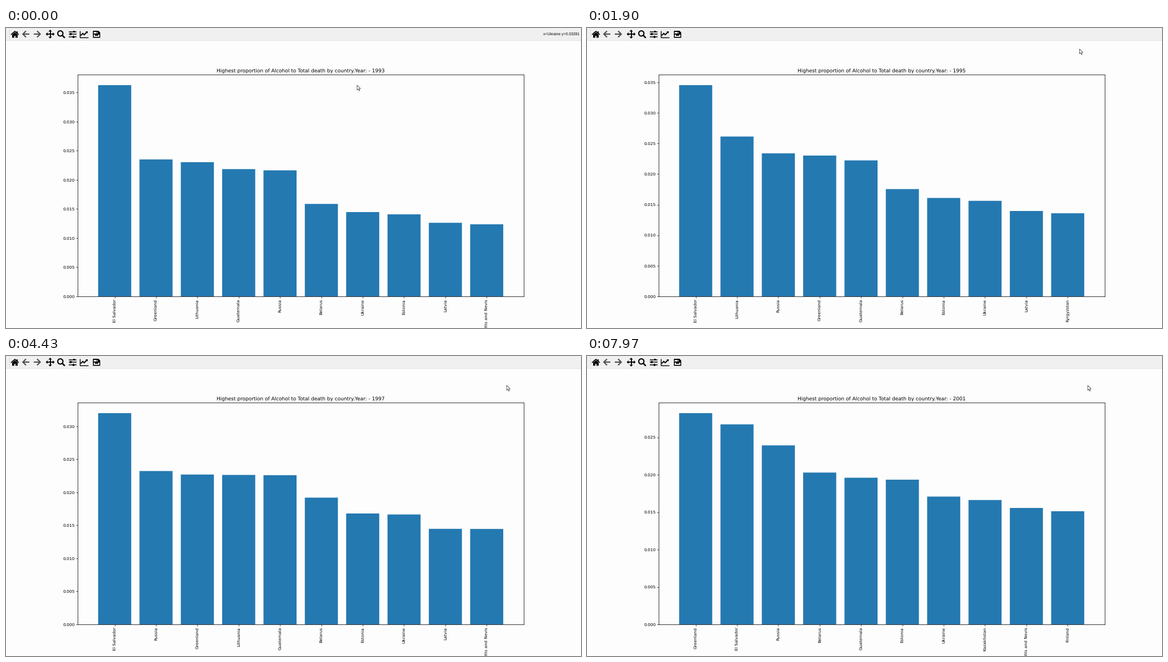
Write a matplotlib script that moves like this. It is 1035x541 px and loops after 8 s.

```python
import matplotlib.pyplot as plt
import numpy as np
from matplotlib.animation import FuncAnimation
from matplotlib.patches import Circle, Polygon, Rectangle
from matplotlib.ticker import FormatStrFormatter, MultipleLocator

W, H, DPI = 1035, 541, 72          # at 72 dpi one point is one pixel
FRAMES, STEP = 200, 40
FIRST_YEAR, LAST_YEAR = 1993, 2001
FIRST_CHANGE, YEAR_MS = 820, 1013
PAPER, BAR, INK, GREY, PANEL = "#fdfdfd", "#2479b1", "#000000", "#4f4f4f", "#f0f0f0"

plt.rcParams["font.family"] = "DejaVu Sans"
plt.rcParams["text.hinting"] = "no_hinting"
plt.rcParams["toolbar"] = "None"

# key shares (1e-5), spread evenly from the first to the last year
TRENDS = {
    "El Salvador": (3628, 3453, 3200, 2974, 2673),
    "Greenland": (2352, 2302, 2270, 2568, 2823),
    "Lithuania": (2305, 2613, 2264, 1621, 1300),
    "Guatemala": (2186, 2260, 1960),
    "Russia": (2165, 2338, 2323, 2246, 2392),
    "Belarus": (1588, 1920, 2029),
    "Ukraine": (1448, 1600, 1730, 1708),
    "Estonia": (1409, 1609, 1680, 1745, 1934),
    "Latvia": (1264, 1440, 1455, 1440),
    "Saint Kitts and Nevis": (1238, 1446, 1556),
    "Kyrgyzstan": (1235, 1400, 1200, 1200),
    "Kazakhstan": (1000, 1270, 1662),
    "Finland": (1200, 1512),
}


def share(name, year):
    keys = TRENDS[name]
    return 1e-5 * np.interp(year, np.linspace(FIRST_YEAR, LAST_YEAR, len(keys)), keys)


def ranking(year):
    pairs = [(share(name, year), name) for name in TRENDS]
    return sorted(pairs, reverse=True)[:10]


fig = plt.figure(figsize=(W / DPI, H / DPI), dpi=DPI, facecolor=PAPER)

# chart
LEFT, RIGHT, TOP, BOTTOM = 129.4, 931.5, 84, 484
ax = fig.add_axes([LEFT / W, 1 - BOTTOM / H, (RIGHT - LEFT) / W, (BOTTOM - TOP) / H],
                  facecolor=PAPER)
bars = ax.bar(range(10), np.ones(10), 0.8, color=BAR, snap=False)
ax.set_xlim(-0.89, 9.89)
ax.set_xticks(range(10))
ax.yaxis.set_major_locator(MultipleLocator(0.005))
ax.yaxis.set_major_formatter(FormatStrFormatter("%.3f"))
ax.tick_params(length=2.6, width=0.7, pad=2.6, labelsize=7.49)
ax.tick_params(axis="x", rotation=90)
for spine in ax.spines.values():
    spine.set_linewidth(0.8)
title = ax.set_title("", fontsize=8.985, pad=4.1)

# window overlay in pixel coordinates, y downwards
top = fig.add_axes([0, 0, 1, 1], zorder=5)
top.set_xlim(0, W)
top.set_ylim(H, 0)
top.axis("off")


def line(pts, lw=2.2, color=INK):
    xs, ys = zip(*pts)
    top.plot(xs, ys, color=color, lw=lw, solid_capstyle="butt", solid_joinstyle="miter")


def shape(pts, color=INK):
    top.add_patch(Polygon(pts, closed=True, fc=color, ec="none"))


def box(x, y, w, h, color=INK):
    top.add_patch(Rectangle((x, y), w, h, fc=color, ec="none"))


def home(x, y):
    line([(x - 7, y + 1), (x, y - 5), (x + 7, y + 1)], 1.7)
    box(x + 3, y - 5.5, 2, 4)
    shape([(x - 5, y + 1), (x, y - 3.2), (x + 5, y + 1), (x + 5, y + 6.5), (x - 5, y + 6.5)])
    box(x - 1.4, y + 2.5, 2.8, 4, PANEL)


def arrow(x, y, d):
    line([(x - 6 * d, y), (x + 5 * d, y)], 2.2, GREY)
    line([(x, y - 5.6), (x + 5.6 * d, y), (x, y + 5.6)], 2.2, GREY)


def move(x, y):
    line([(x - 6, y), (x + 6, y)], 1.9)
    line([(x, y - 6), (x, y + 6)], 1.9)
    for dx, dy in ((1, 0), (-1, 0), (0, 1), (0, -1)):
        shape([(x + 8 * dx, y + 8 * dy),
               (x + 4.7 * dx - 3.2 * dy, y + 4.7 * dy + 3.2 * dx),
               (x + 4.7 * dx + 3.2 * dy, y + 4.7 * dy - 3.2 * dx)])


def lens(x, y):
    top.add_patch(Circle((x - 1.2, y - 1.2), 4.7, fc="none", ec=INK, lw=2.1))
    line([(x + 2, y + 2), (x + 6.8, y + 6.8)], 2.6)


def sliders(x, y):
    for dy, knob in ((-4.8, 3), (0, -3.2), (4.8, 2)):
        line([(x - 7, y + dy), (x + 7, y + dy)], 1.5)
        box(x + knob - 1.5, y + dy - 1.9, 3, 3.8)


def chart(x, y):
    line([(x - 7.5, y - 6), (x - 7.5, y + 5.8), (x + 8, y + 5.8)], 1.4)
    line([(x - 5.5, y + 2.5), (x - 1.8, y - 1.2), (x + 0.8, y + 1.2), (x + 5.5, y - 3.6)], 2)
    shape([(x + 2.6, y - 5.4), (x + 7, y - 5.4), (x + 7, y - 1)])


def disk(x, y):
    shape([(x - 6.5, y - 6), (x + 3.5, y - 6), (x + 6.5, y - 3),
           (x + 6.5, y + 6.7), (x - 6.5, y + 6.7)])
    box(x - 4.6, y - 4.4, 7, 3.2, PANEL)
    box(x - 4.6, y + 1, 9.2, 4.2, PANEL)
    box(x - 0.2, y - 4.4, 1.6, 3.2)
    box(x - 3, y + 1, 6, 2.4)


box(0, 0, W, 21.5, PANEL)
line([(0, 21.5), (W, 21.5)], 0.8, "#d9d9d9")
line([(5.5, 2), (5.5, 20)], 0.8, "#d6d6d6")
home(16, 11)
arrow(36, 11, -1)
arrow(56, 11, 1)
move(79.5, 11)
lens(99, 11)
sliders(119.7, 11.3)
chart(140, 11)
disk(163, 11)

readout = top.text(967, 11.2, "", fontsize=6.9, family="Liberation Sans", va="center")
POINTER = np.array([(0, 0), (0, 8.8), (2, 7), (3.5, 10.3), (4.8, 9.7),
                    (3.4, 6.5), (6.2, 6.3)])
pointer = Polygon(POINTER, closed=True, fc="white", ec="#303040", lw=0.75)
top.add_patch(pointer)

# pointer moves: start ms, end ms, x, y
START = (632, 103)
MOVES = ((700, 1400, 878.5, 29.5), (1700, 2150, 901.3, 53))


def smooth(u):
    u = min(max(u, 0), 1)
    return u * u * (3 - 2 * u)


def pointer_at(t):
    x, y = START
    for a, b, px, py in MOVES:
        k = smooth((t - a) / (b - a))
        x, y = x + (px - x) * k, y + (py - y) * k
    return x, y


def year_at(t):
    return FIRST_YEAR + max(0, (t - FIRST_CHANGE) // YEAR_MS + 1)


def readout_text(t, x, y, names, limit):
    if t <= MOVES[0][0]:
        return "x=Ukraine y=0.03281"
    if y < TOP:
        return ""
    slot = round((x - LEFT) / (RIGHT - LEFT) * 10.78 - 0.89)
    value = (BOTTOM - y) / (BOTTOM - TOP) * limit
    return f"x={names[slot]} y={value:.5f}"


def draw(i):
    t = i * STEP
    year = year_at(t)
    shares, names = zip(*ranking(year))
    limit = shares[0] * 1.05
    for bar, value in zip(bars, shares):
        bar.set_height(value)
    ax.set_ylim(0, limit)
    ax.set_xticklabels(names)
    title.set_text(f"Highest proportion of Alcohol to Total death by country.Year: - {year}")

    x, y = pointer_at(t)
    pointer.set_xy(POINTER + (x, y))
    readout.set_text(readout_text(t, x, y, names, limit))
    return []


anim = FuncAnimation(fig, draw, frames=FRAMES, interval=STEP, init_func=lambda: draw(0),
                     repeat=True, repeat_delay=0, blit=False)
plt.show()
```
